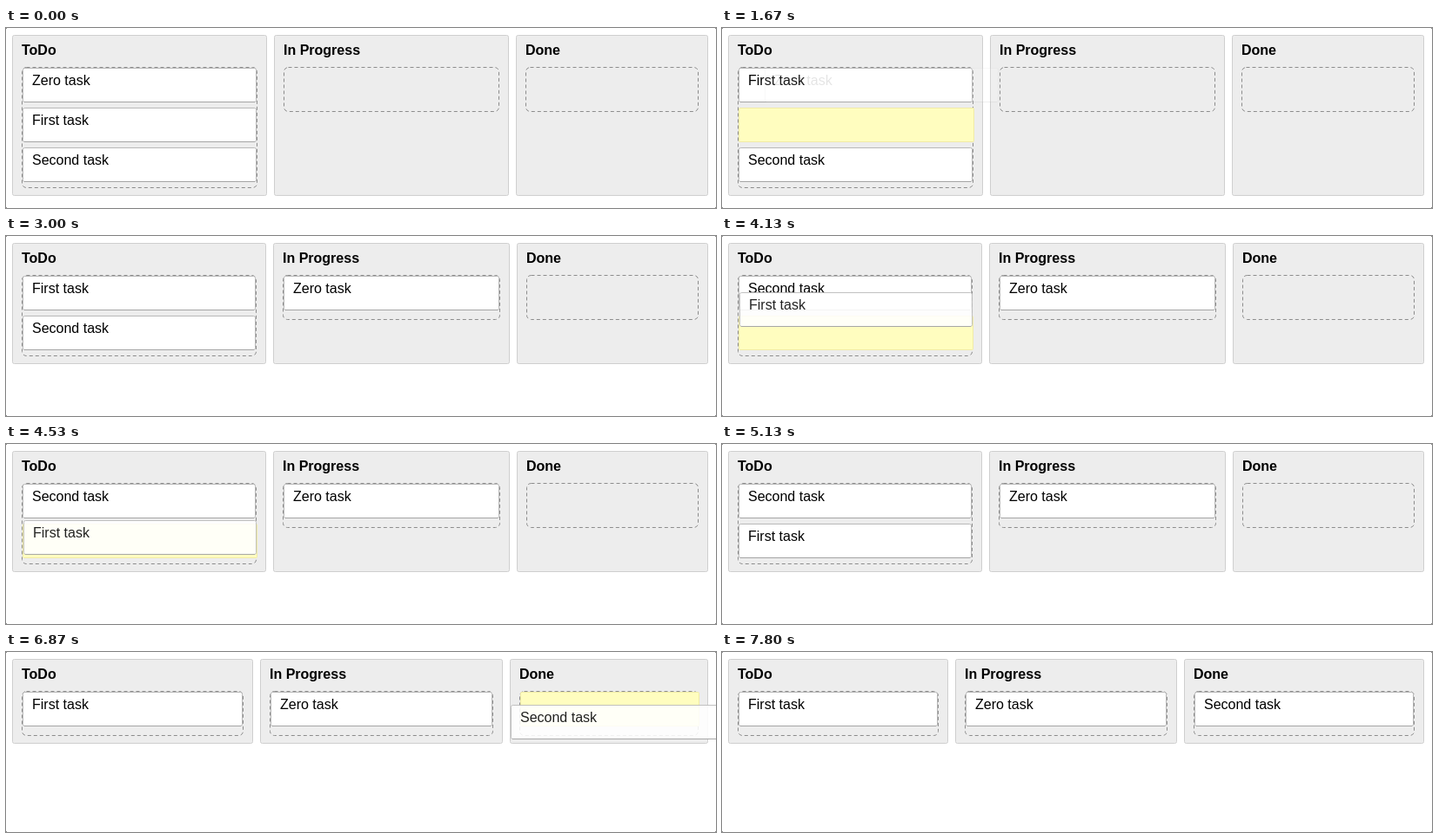
An HTML page with a canvas that plays this animation: 816 by 208 pixels, repeating every 9.27 s.

```html
<!DOCTYPE html>
<html lang="en">
<head>
<meta charset="utf-8">
<title>Task board</title>
<style>
html, body { margin: 0; width: 100%; height: 100%; overflow: hidden; background: #fff; }
canvas { display: block; width: 816px; height: 208px; }
</style>
</head>
<body>
<canvas id="stage" width="816" height="208"></canvas>
<script>
const ctx = document.getElementById('stage').getContext('2d');
const LOOP = 9270;
const FONT = '16px "Liberation Sans", Arial, sans-serif';
const TITLES = ['ToDo', 'In Progress', 'Done'];
const GAP = '';           // marks the drop placeholder
const GRAB = 61;          // pointer offset inside a dragged card
const FADE_OUT = 130;

// Left and right edges of the three columns
const WIDE_TODO = [[7, 300], [308, 578], [586, 807]];
const ONE_MOVED = [[7, 299], [307, 579], [587, 807]];
const TWO_LEFT = [[7, 284], [292, 571], [579, 807]];
const EVEN = [[7, 260], [268, 523], [531, 807]];

const clamp = v => Math.max(0, Math.min(1, v));
const easeOut = (u, p) => 1 - Math.pow(1 - u, p);
const smooth = u => u * u * (3 - 2 * u);

const drags = [
  {
    start: 1670, drop: 2600, card: 'Zero task', w: 269,
    at: u => [49 + 283 * smooth(u), 46 + 6 * smooth(u)],
    before: [['Zero task', 'First task', 'Second task'], [], []],
    edges: WIDE_TODO, dragEdges: WIDE_TODO,
    lists: col => col === 0
      ? [['First task', GAP, 'Second task'], [], []]
      : [['First task', 'Second task'], [GAP], []]
  },
  {
    start: 3930, drop: 4870, card: 'First task', w: 268, intro: 65,
    at: u => [20, 46 + 46 * easeOut(u, 2)],
    before: [['First task', 'Second task'], ['Zero task'], []],
    edges: ONE_MOVED, dragEdges: ONE_MOVED,
    lists: () => [['Second task', GAP], ['Zero task'], []]
  },
  {
    start: 6130, drop: 7070, card: 'Second task', w: 268, intro: 65,
    at: u => [60 + 520 * easeOut(u, 5.6), 46 + 15 * easeOut(u, 10)],
    before: [['Second task', 'First task'], ['Zero task'], []],
    edges: ONE_MOVED, dragEdges: TWO_LEFT,
    lists: col => [
      ['First task', ...(col === 0 ? [GAP] : [])],
      ['Zero task', ...(col === 1 ? [GAP] : [])],
      col === 2 ? [GAP] : []
    ]
  }
];
const finalLists = [['First task'], ['Zero task'], ['Second task']];

function box(x, y, w, h, r, fill, line) {
  ctx.beginPath();
  ctx.roundRect(x + 0.5, y + 0.5, w - 1, h - 1, r);
  if (fill) {
    ctx.fillStyle = fill;
    ctx.fill();
  }
  ctx.strokeStyle = line;
  ctx.stroke();
}

function label(text, x, y, bold) {
  ctx.font = (bold ? 'bold ' : '') + FONT;
  ctx.fillStyle = '#000';
  ctx.fillText(text, x, y);
}

function card(text, x, y, w) {
  box(x, y, w, 40, 2, '#fff', '#b8b8b8');
  ctx.fillStyle = '#a4a4a4';
  ctx.fillRect(x + 2, y + 39, w - 4, 1);
  label(text, x + 11, y + 20);
}

function board(lists, edges) {
  const most = Math.max(...lists.map(l => l.length));
  const height = 46 + Math.max(52, 2 + 46 * most);
  lists.forEach((list, i) => {
    const [left, right] = edges[i];
    const x = left + 11;
    const w = right - left - 22;
    box(left, 8, right - left, height, 2, '#ededed', '#cfcfcf');
    label(TITLES[i], x, 31, true);
    ctx.setLineDash([4, 3]);
    box(x, 45, w, Math.max(52, 2 + 46 * list.length), 5, null, '#8c8c8c');
    ctx.setLineDash([]);
    list.forEach((text, n) => {
      const y = 46 + 46 * n;
      if (text === GAP) box(x + 1, y, w, 40, 1, '#fffdbf', '#f0eba6');
      else card(text, x + 1, y, w - 2);
    });
  });
}

function ghost(drag, t, x, y) {
  const shown = 0.1 + 0.77 * clamp((t - drag.start) / 150);
  const left = 1 - clamp((t - drag.drop) / FADE_OUT);
  if (left <= 0) return;
  ctx.globalAlpha = shown * left;
  card(drag.card, x, y, drag.w);
  ctx.globalAlpha = 1;
}

function corners() {
  ctx.fillStyle = '#8a8a8a';
  for (const x of [0, 815]) for (const y of [0, 207]) ctx.fillRect(x, y, 1, 1);
}

function draw(t) {
  ctx.fillStyle = '#fff';
  ctx.fillRect(0, 0, 816, 208);
  ctx.lineWidth = 1;

  const next = drags.find(d => t < d.drop);
  if (!next) {
    board(finalLists, EVEN);
  } else if (t < next.start) {
    board(next.before, next.edges);
  } else if (t < next.start + (next.intro || 0)) {
    const [first, ...rest] = next.before;
    board([[first[0], GAP, first[1]], ...rest], next.edges);
  } else {
    const x = next.at(clamp((t - next.start) / 870))[0] + GRAB;
    const col = next.dragEdges.filter(e => x >= e[0]).length - 1;
    board(next.lists(col), next.dragEdges);
  }

  const held = drags.find(d => t >= d.start && t < d.drop + FADE_OUT);
  if (held) {
    const [x, y] = held.at(clamp((t - held.start) / 870));
    ghost(held, t, Math.round(x), Math.round(y));
  }
  corners();
}

const begin = performance.now();
function tick() {
  draw((performance.now() - begin) % LOOP);
  requestAnimationFrame(tick);
}
tick();
</script>
</body>
</html>
```
